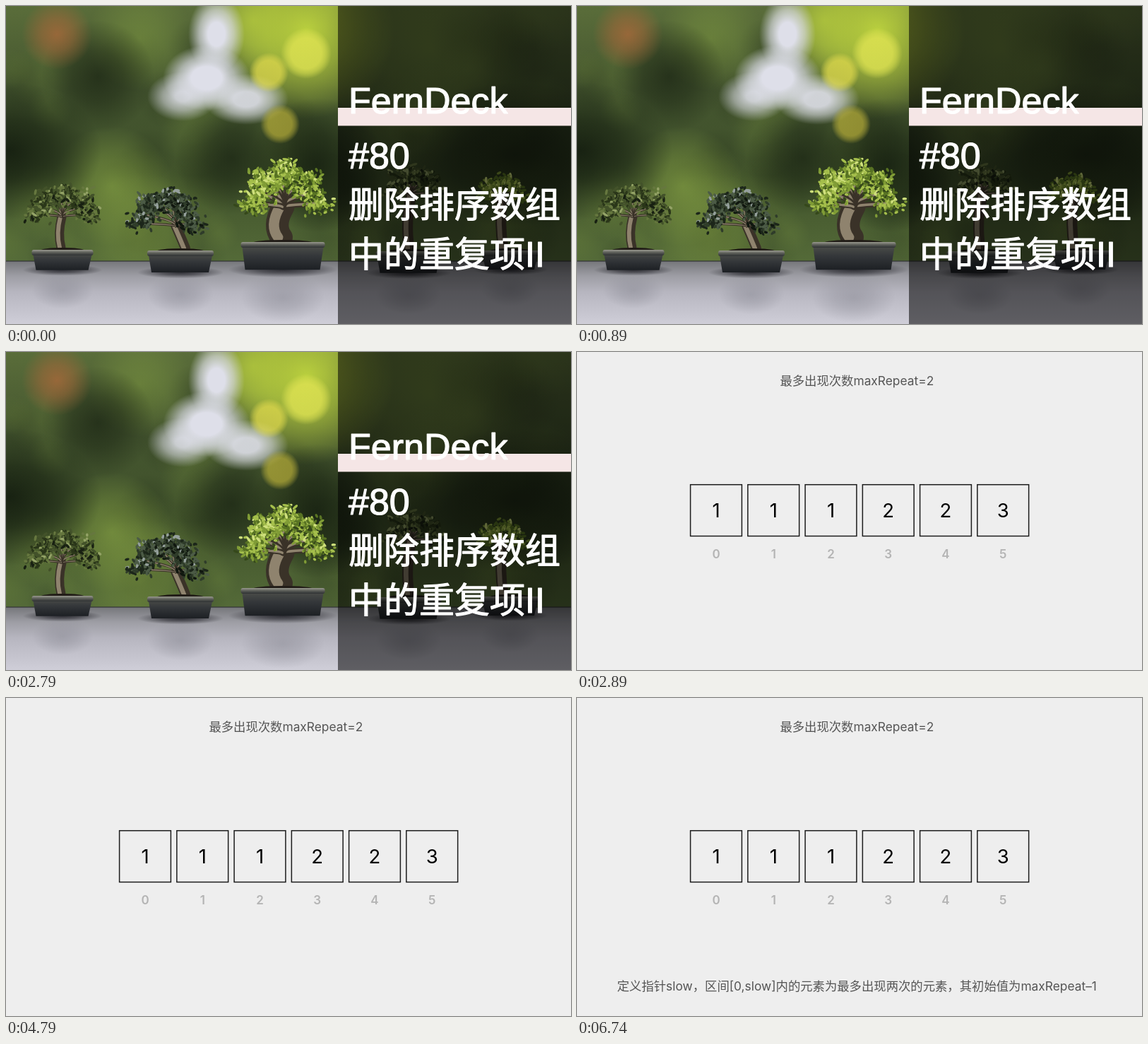
These frames come from a looping animation (800 by 450 pixels, 8 s). An HTML page with a canvas:

```html
<!DOCTYPE html>
<html lang="zh-CN">
<head>
<meta charset="utf-8">
<style>
html, body { margin: 0; width: 100%; height: 100%; overflow: hidden; background: #eee; }
canvas { display: block; width: 800px; height: 450px; }
</style>
</head>
<body>
<canvas id="stage" width="800" height="450"></canvas>
<script>
const W = 800, H = 450, LOOP = 8000;
const CUT = 2890, NOTE = 6740;
const CJK = '"Noto Sans CJK SC", "Noto Sans CJK", sans-serif';
const stage = document.getElementById('stage').getContext('2d');

let seed = 7;
function rnd() {
  seed = (seed * 16807) % 2147483647;
  return seed / 2147483647;
}
const spread = r => (rnd() + rnd() - 1) * r;

function layer(draw) {
  const c = document.createElement('canvas');
  c.width = W;
  c.height = H;
  draw(c.getContext('2d'));
  return c;
}

function vertical(g, y0, y1, colors) {
  const fill = g.createLinearGradient(0, y0, 0, y1);
  colors.forEach((c, i) => fill.addColorStop(i / (colors.length - 1), c));
  return fill;
}

// Out-of-focus spot; core is the share of the radius that stays solid
function blob(g, rgb, alpha, x, y, r, squash = 1, core = 0) {
  g.save();
  g.translate(x, y);
  g.scale(r, r * squash);
  const fill = g.createRadialGradient(0, 0, core, 0, 0, 1);
  fill.addColorStop(0, `rgba(${rgb},${alpha})`);
  fill.addColorStop(0.45, `rgba(${rgb},${alpha * 0.65})`);
  fill.addColorStop(1, `rgba(${rgb},0)`);
  g.fillStyle = fill;
  g.fillRect(-1, -1, 2, 2);
  g.restore();
}

function backdrop(g) {
  g.fillStyle = vertical(g, 0, 360, ['#5a6d3a', '#44552f', '#40522b', '#546a38']);
  g.fillRect(0, 0, W, 362);

  const dark = '24,34,18', green = '122,148,64', bright = '186,208,62', pale = '222,223,233';
  for (let i = 0; i < 70; i++) {
    blob(g, i % 2 ? dark : green, 0.22, rnd() * W, rnd() * 360, 25 + rnd() * 40);
  }
  blob(g, green, 0.6, 190, 45, 75);
  blob(g, green, 0.8, 150, 255, 85);
  blob(g, green, 0.6, 190, 325, 90);
  blob(g, dark, 1, 5, 205, 130, 0.75);
  blob(g, dark, 0.7, 130, 100, 80);
  blob(g, dark, 0.7, 320, 215, 80);
  blob(g, bright, 1, 425, 35, 125);
  blob(g, bright, 0.7, 350, 20, 75);
  blob(g, dark, 0.9, 440, 225, 95);
  blob(g, '168,104,58', 0.8, 72, 40, 50);

  blob(g, pale, 1, 298, 40, 40, 1.4, 0.3);
  blob(g, pale, 1, 284, 102, 62, 0.75, 0.35);
  blob(g, pale, 0.85, 250, 128, 50, 0.7, 0.2);
  blob(g, pale, 0.9, 340, 132, 60, 0.6, 0.3);
  blob(g, '222,216,76', 0.75, 372, 94, 28, 1, 0.6);
  blob(g, '222,226,82', 0.8, 425, 67, 36, 1, 0.6);
  blob(g, '176,168,56', 0.75, 388, 167, 28, 1, 0.6);

  blob(g, green, 0.6, 600, 60, 150);
  blob(g, dark, 0.85, 720, 210, 170, 0.6);
}

function table(g) {
  g.fillStyle = vertical(g, 360, H, ['#737478', '#9e9ea5', '#b7b6c0', '#c3c2cc', '#cfced8']);
  g.fillRect(0, 361, W, H - 361);
  g.fillStyle = 'rgba(50,52,54,.6)';
  g.fillRect(0, 360, W, 2);
}

function pot(g, cx, y, w) {
  const h = w * 0.33, x = cx - w / 2;
  blob(g, '36,36,42', 0.9, cx, y + h, w * 0.65, 0.14);
  blob(g, '140,140,150', 0.55, cx, y + h * 2, w * 0.5, 0.6);
  g.fillStyle = '#211c17';
  g.beginPath();
  g.ellipse(cx, y + 1, w * 0.36, 4, 0, 0, 7);
  g.fill();
  g.fillStyle = vertical(g, y, y + h, ['#55564f', '#34373a', '#1d2024']);
  g.beginPath();
  g.moveTo(x + 2, y + 7);
  g.lineTo(x + w - 2, y + 7);
  g.lineTo(x + w - 7, y + h);
  g.lineTo(x + 6, y + h);
  g.fill();
  g.fillStyle = vertical(g, y, y + 8, ['#9a9a90', '#595b56', '#2d3032']);
  g.beginPath();
  g.roundRect(x, y, w, 8, 3);
  g.fill();
}

function limb(g, width, x0, y0, cx, cy, x1, y1) {
  for (const [shift, share, color] of [[0, 1, '#3a3228'], [-0.15, 0.45, '#8f836e']]) {
    const dx = shift * width;
    g.strokeStyle = color;
    g.lineWidth = width * share;
    g.lineCap = 'round';
    g.beginPath();
    g.moveTo(x0 + dx, y0);
    g.quadraticCurveTo(cx + dx, cy, x1 + dx, y1);
    g.stroke();
  }
}

function foliage(g, x, y, rx, ry, colors) {
  for (let i = 0; i < rx * ry / 6; i++) {
    const dy = spread(ry);
    const light = rnd() * 0.7 + (1 - dy / ry) * 0.15;
    g.fillStyle = colors[Math.floor(light * colors.length)];
    g.beginPath();
    g.ellipse(x + spread(rx), y + dy, 2.2 + rnd() * 2.6, 1.8, rnd() * 3, 0, 7);
    g.fill();
  }
}

// Trunk from (x, base) to a fork below a dome of leaf clumps
function tree(g, x, base, girth, cx, top, bottom, half, colors) {
  const tall = bottom - top, fork = bottom - tall * 0.1, fx = (x + cx) / 2;
  limb(g, girth, x, base - girth * 0.3, x - girth * 0.4, (base + fork) / 2, fx, fork);
  const clumps = 9;
  const spots = Array.from({ length: clumps }, (_, i) => {
    const a = Math.PI * i / (clumps - 1), reach = i % 2 ? 0.75 : 1;
    return [cx + Math.cos(a) * half * 0.68 * reach, bottom - tall * (0.16 + 0.6 * Math.sin(a) * reach)];
  });
  for (const [sx, sy] of spots) limb(g, girth * 0.25, fx, fork, fx, (fork + sy) / 2, sx, sy);
  for (const [sx, sy] of spots) foliage(g, sx, sy, half * 0.38, tall * 0.25, colors);
}

function trees(g) {
  const olive = ['#182012', '#2a3619', '#43522a', '#66773f', '#93a266'];
  const slate = ['#10170f', '#1c261a', '#2f3c2a', '#4c5b46', '#95a09c'];
  const lime = ['#35481a', '#587323', '#809c36', '#a5bf4c', '#cfe07c'];
  tree(g, 78, 346, 13, 80, 247, 304, 53, olive);
  tree(g, 254, 347, 14, 227, 252, 318, 56, slate);
  tree(g, 390, 337, 32, 395, 214, 292, 67, lime);
  tree(g, 571, 347, 15, 577, 222, 272, 46, olive);
  tree(g, 704, 347, 15, 702, 236, 276, 38, lime);
  pot(g, 80, 345, 87);
  pot(g, 247, 346, 94);
  pot(g, 392, 334, 119);
  pot(g, 570, 347, 93);
  pot(g, 714, 346, 82);
}

function heading(g, str, y, size = 50) {
  g.font = `${size}px "Liberation Sans", ${CJK}`;
  g.fillStyle = g.strokeStyle = '#fff';
  g.lineWidth = 1.2;
  g.lineJoin = 'round';
  g.fillText(str, 485, y);
  g.strokeText(str, 485, y);
}

function cover(g) {
  backdrop(g);
  table(g);
  trees(g);
  g.fillStyle = 'rgba(0,0,0,.54)';
  g.fillRect(470, 0, 330, H);
  g.fillStyle = '#f5e6e6';
  g.fillRect(470, 144, 330, 25.5);
  heading(g, 'FernDeck', 151.5, 52);
  heading(g, '#80', 229.5, 52);
  heading(g, '删除排序数组', 299);
  heading(g, '中的重复项II', 369);
}

function label(g, str, x, y, size, color, weight = 400) {
  g.font = `${weight} ${size}px Inter, ${CJK}`;
  g.textAlign = 'center';
  g.fillStyle = color;
  g.fillText(str, x, y);
}

function cells(g) {
  g.fillStyle = '#eee';
  g.fillRect(0, 0, W, H);
  label(g, '最多出现次数maxRepeat=2', 396.3, 46.5, 17.35, '#555');
  g.strokeStyle = '#1c1c1c';
  g.lineWidth = 1.5;
  [1, 1, 1, 2, 2, 3].forEach((value, i) => {
    const x = 160.6 + i * 81.25;
    g.strokeRect(x, 187.7, 72.8, 72.8);
    label(g, value, x + 36.4, 233.7, 27.5, '#000');
    label(g, i, x + 36.4, 292.2, 17, '#b4b4b4', 600);
  });
}

function note(g) {
  cells(g);
  label(g, '定义指针slow，区间[0,slow]内的元素为最多出现两次的元素，其初始值为maxRepeat–1', 396.3, 413.5, 17.35, '#555');
}

const scenes = [cover, cells, note].map(layer);

function frame() {
  const t = performance.now() % LOOP;
  stage.drawImage(scenes[t < CUT ? 0 : t < NOTE ? 1 : 2], 0, 0);
  requestAnimationFrame(frame);
}
frame();
</script>
</body>
</html>
```
